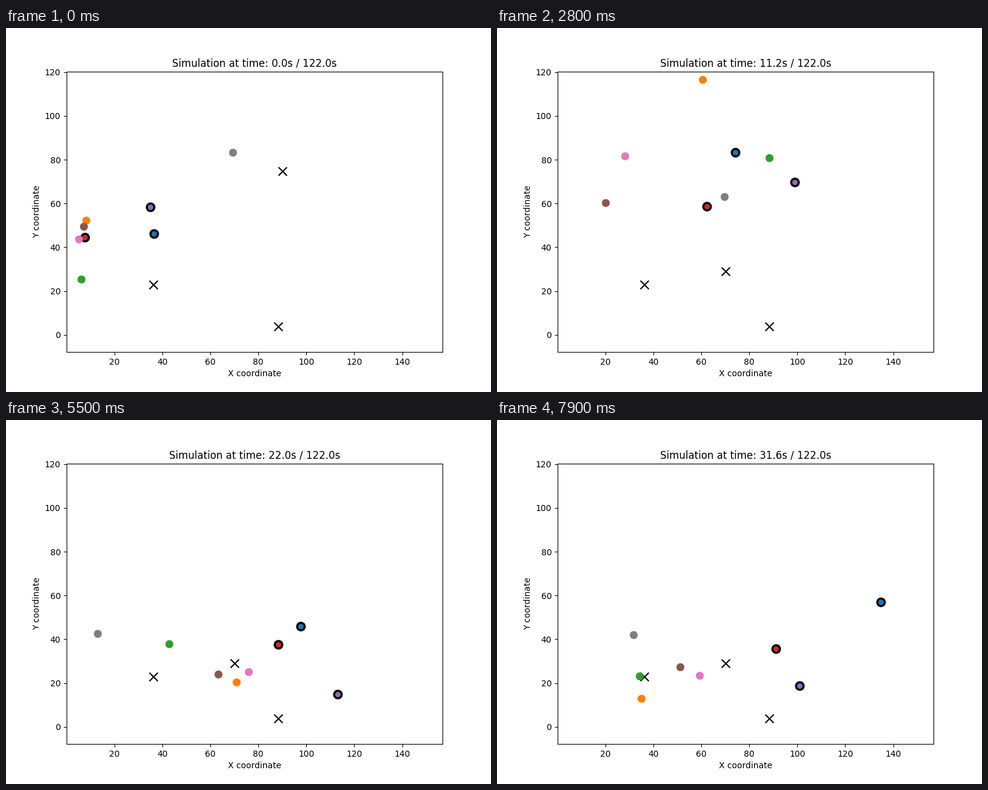
Animation of 800 by 600 pixels, one loop 8000 ms. Source, as a matplotlib script:

```python
import numpy as np
import matplotlib.pyplot as plt
from matplotlib.animation import FuncAnimation

W, H, DPI = 800, 600, 100
FRAMES, INTERVAL = 80, 100
STEP, TOTAL = 0.4, 122.0          # simulated seconds per frame, full run
SWITCH = 1.6                      # second when one target is replaced

# Each dot glides through a few stage points (x, y), shared times in seconds.
TIMES = np.array([0, 1.3, 2.8, 4.0, 5.5, 6.4, 7.9])
WAYPOINTS = {
    "C0": [(244.2, 339), (247.2, 242), (393.2, 205.4), (446.3, 261), (486.2, 340.2), (508.5, 302), (632.5, 300)],
    "C1": [(131.6, 317), (190.3, 191.2), (339.4, 85.5), (452.4, 217.3), (380, 432.3), (371.3, 492), (238, 459)],
    "C2": [(123.6, 414.2), (163.9, 199.9), (449.1, 213.6), (435.1, 398.2), (269.2, 368.6), (218.3, 406), (235.4, 422.3)],
    "C3": [(129.5, 344.5), (219, 259.6), (346.3, 294.2), (414.8, 385.5), (449.1, 369.8), (418.9, 358.2), (459.9, 377.2)],
    "C4": [(238.3, 295.3), (350, 240.4), (490.6, 253.9), (572.2, 314.7), (547.1, 452.2), (508.6, 474.6), (499.2, 438)],
    "C5": [(128.4, 327), (149.2, 229.5), (179.2, 287.7), (273.2, 356.4), (349.5, 418.9), (439.8, 453.7), (302, 406.7)],
    "C6": [(120.3, 348.1), (109.2, 198.5), (210.5, 210.8), (323.1, 284.3), (400.4, 414.7), (416.6, 449.4), (334.2, 421.1)],
    "C7": [(373.9, 205.3), (414.7, 180.6), (375, 277.9), (305.6, 325.3), (151.4, 352.1), (106.2, 301.2), (224.6, 354.4)],
}
RINGED = {"C0", "C3", "C4"}
FIXED = [(243.2, 423.2), (449.1, 492.1)]
MOVED = [(456.2, 236.3), (377.1, 401.1)]


def spline(t, p, at):
    """Natural cubic spline through points p at times t."""
    n, h = len(t), np.diff(t)
    slope = np.diff(p, axis=0) / h[:, None]
    a, b = np.eye(n), np.zeros_like(p)
    for i in range(1, n - 1):
        a[i, i - 1:i + 2] = h[i - 1], 2 * (h[i - 1] + h[i]), h[i]
        b[i] = 6 * (slope[i] - slope[i - 1])
    m = np.linalg.solve(a, b)
    k = np.clip(np.searchsorted(t, at, side="right") - 1, 0, n - 2)
    d, hk = (at - t[k])[:, None], h[k][:, None]
    c1 = slope[k] - hk * (2 * m[k] + m[k + 1]) / 6
    return p[k] + d * (c1 + d * (m[k] / 2 + d * (m[k + 1] - m[k]) / (6 * hk)))


def to_data(points):
    x, y = np.asarray(points, float).T
    return ax.transData.inverted().transform(np.c_[x, H - y])


fig, ax = plt.subplots(figsize=(W / DPI, H / DPI), dpi=DPI)
ax.set(xlim=(0.07, 156.8), ylim=(-7.8, 120.18),
       xlabel="X coordinate", ylabel="Y coordinate")
title = ax.set_title("")

targets = [to_data(FIXED + [last]) for last in MOVED]
crosses = ax.scatter(*targets[0].T, s=100, c="black", marker="x")

clock = np.arange(FRAMES) * INTERVAL / 1000
tracks, dots = [], []
for color, points in WAYPOINTS.items():
    track = to_data(spline(TIMES, np.array(points, float), clock))
    ring = color in RINGED
    tracks.append(track)
    dots.append(ax.scatter(*track[0], s=80, color=color,
                           edgecolors="black" if ring else color,
                           linewidths=2.5 if ring else 0.5))


def update(i):
    title.set_text(f"Simulation at time: {i * STEP:.1f}s / {TOTAL}s")
    crosses.set_offsets(targets[int(clock[i] >= SWITCH)])
    for dot, track in zip(dots, tracks):
        dot.set_offsets(track[i])
    return [title, crosses, *dots]


anim = FuncAnimation(fig, update, frames=FRAMES, interval=INTERVAL,
                     init_func=lambda: update(0), repeat=True, repeat_delay=0)
plt.show()
```
